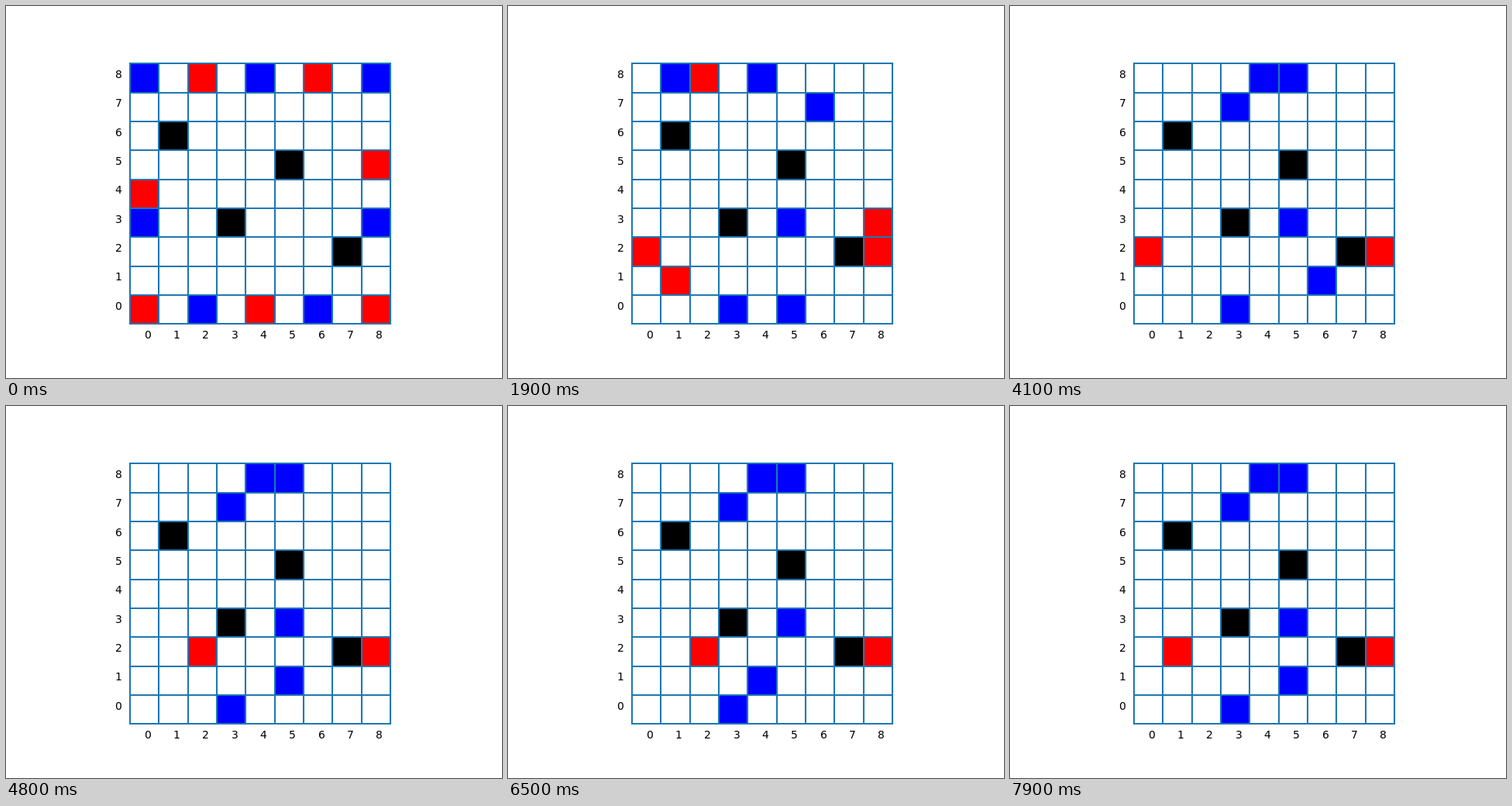
Recreate the animation shown at these times as an HTML page. Size 640x480 px, loop 8 s.

```html
<!DOCTYPE html>
<html>
<head>
<meta charset="utf-8">
<style>
html, body { margin: 0; width: 100%; height: 100%; overflow: hidden; background: #fff; }
svg { display: block; }
text { font: 13.89px "DejaVu Sans", sans-serif; }
</style>
</head>
<body>
<svg width="640" height="480">
  <g id="cells"></g>
  <path id="grid" fill="none" stroke="#1f77b4" stroke-width="2.08" stroke-linecap="square"/>
  <g id="labels"></g>
</svg>
<script>
const SIZE = 336 / 9, STEP_MS = 100, LOOP_MS = 8000;
const DIRS = { U: 1, D: -1, R: 10, L: -10 };
const get = id => document.getElementById(id);
const px = col => Math.round(160 + col * SIZE);
const py = row => Math.round(410.4 - row * SIZE);

// A cell is column * 10 + row; a move is a cell and a direction. Blue starts.
const START = {
  blue: [8, 48, 88, 3, 83, 20, 60],
  red: [28, 68, 85, 4, 0, 40, 80],
  black: [16, 55, 33, 72]
};
const moves = (
  '20R 85D 60L 80U 83L 84D 73L 81U 63L ' +
  '00U 03D 04D 88L 68L 78L 03D 08R 01R 68D ' +
  '28R 18R 83L 28D 11R 27R 21R 67L 73L 57U 63D 50L 62D ' +
  '40U 61U 53D 31U 41R 32R 51R 42U 52U'
).split(' ').map(m => [+m.slice(0, 2), DIRS[m[2]]]);

// The last two active pieces wander in turn.
const redWalk = 'RRLRLRLRLUDRULDRLRL', blueWalk = 'LRLRLRUDLLRLRRLRLRL';
let red = 2, blue = 61;
[...redWalk].forEach((r, i) => {
  const dr = DIRS[r], db = DIRS[blueWalk[i]];
  moves.push([red, dr], [blue, db]);
  red += dr;
  blue += db;
});

function play(board, [from, dir]) {
  const side = board.get(from), to = from + dir;
  board.delete(from);
  board.set(to, side);
  // An enemy caught between this piece and a friend or a black cell is removed.
  for (const d of Object.values(DIRS)) {
    const victim = board.get(to + d), far = board.get(to + 2 * d);
    if (victim && victim !== side && victim !== 'black' && (far === side || far === 'black'))
      board.delete(to + d);
  }
}

function boardAt(step) {
  const board = new Map();
  for (const side in START) START[side].forEach(c => board.set(c, side));
  moves.slice(0, step).forEach(m => play(board, m));
  return board;
}

function rect(cell, color) {
  const col = Math.floor(cell / 10), row = cell % 10;
  const x = px(col), y = py(row + 1);
  return `<rect x="${x}" y="${y}" width="${px(col + 1) - x}" height="${py(row) - y}" fill="${color}"/>`;
}

let lines = '', labels = '';
for (let i = 0; i <= 9; i++) {
  lines += `M${px(i)} ${py(0)}V${py(9)}M${px(0)} ${py(i)}H${px(9)}`;
  if (i < 9) labels +=
    `<text x="${px(i + .5)}" y="${py(-.5)}">${i}</text>` +
    `<text x="${px(-.5)}" y="${py(i + .5)}">${i}</text>`;
}
get('grid').setAttribute('d', lines);
get('labels').innerHTML = labels;

let shown = -1;
function draw() {
  const step = Math.floor(performance.now() % LOOP_MS / STEP_MS);
  if (step !== shown) {
    shown = step;
    get('cells').innerHTML = [...boardAt(step)].map(([c, side]) => rect(c, side)).join('');
  }
  requestAnimationFrame(draw);
}
draw();
</script>
</body>
</html>
```
